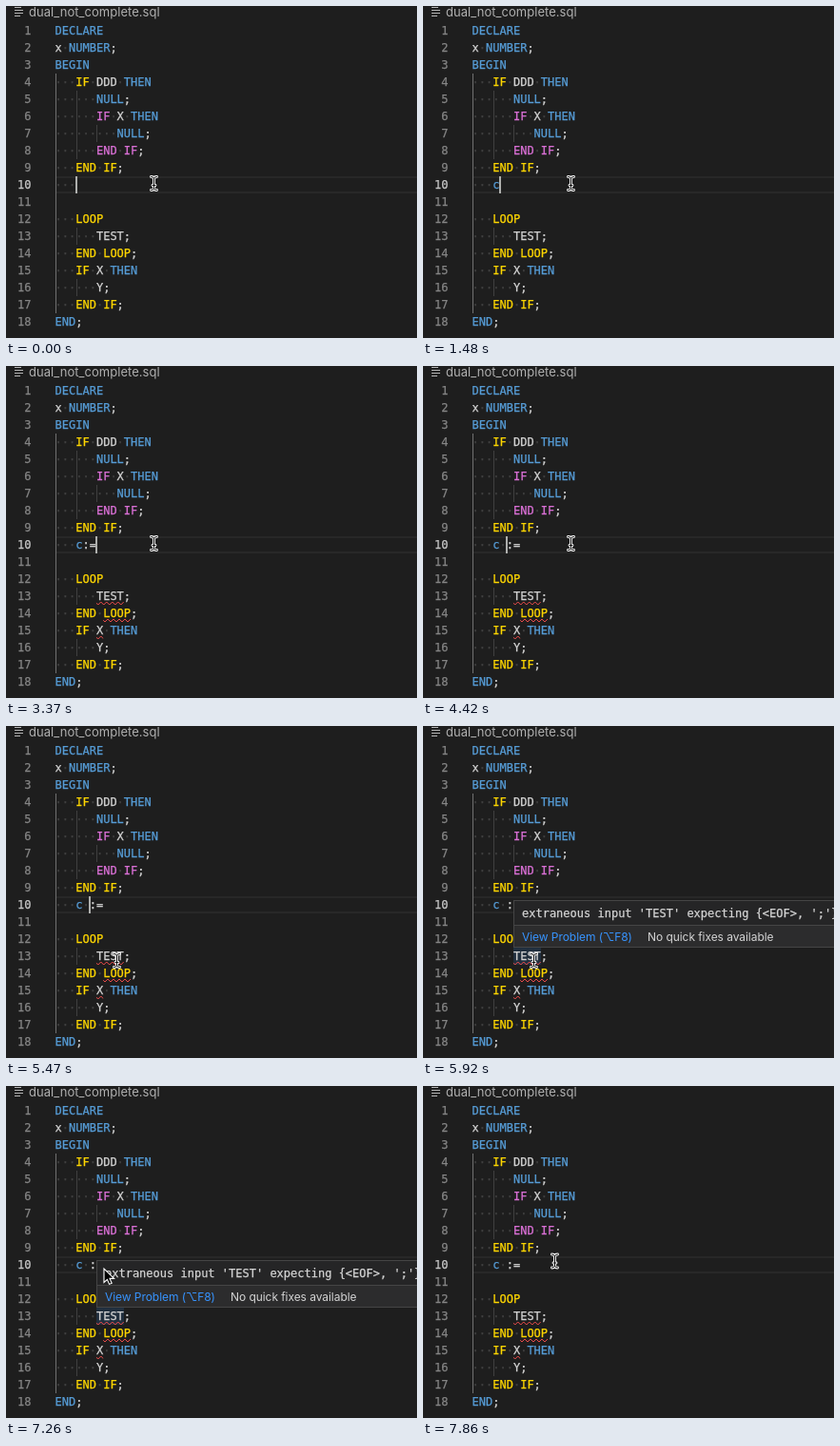
An HTML page for the animation above (8 s loop, 432x349 px).

```html
<!DOCTYPE html>
<html lang="en">
<head>
<meta charset="utf-8">
<style>
  html, body { margin: 0; width: 100%; height: 100%; overflow: hidden; background: #1e1e1e; }
  svg { display: block; }
  text { white-space: pre; color: #d4d4d4; fill: currentColor; }
  .mono { font: 12px "DejaVu Sans Mono", monospace; }
  .mono text, text.mono { stroke: currentColor; stroke-width: .25px; }
  .ui { font: 12px Inter, "DejaVu Sans", sans-serif; letter-spacing: -.06px; }
  .title { font-size: 13px; letter-spacing: .04px; color: #b0b0b0; }
  .link { color: #3794ff; }
  .y { color: #ffd700; }
  .m { color: #da70d6; }
  .b { color: #569cd6; }
  .dot { color: #404040; }
  .num { color: #858585; text-anchor: end; }
  .active { color: #c6c6c6; }
  .wave { fill: none; stroke: #f14c4c; }
</style>
</head>
<body>
<svg width="432" height="349" viewBox="0 0 432 349">
  <rect width="432" height="349" fill="#1e1e1e"/>
  <path d="M9 1.5h7M9 4.5h9M9 7.5h9M9 10.5h6" stroke="#b5b5b5"/>
  <text class="ui title" x="24" y="10.5">dual_not_complete.sql</text>
  <path d="M52 180H432M52 196H432" stroke="#282828" stroke-width="2"/>
  <rect id="hover" x="95" y="233" width="29" height="18" fill="#264f78" opacity=".35"/>
  <g id="guides" shape-rendering="crispEdges"></g>
  <g id="code" class="mono"></g>
  <g id="typed" class="mono"></g>
  <g id="waves"></g>
  <rect id="caret" y="179" width="2" height="18" fill="#aeafad"/>
  <g id="tip">
    <rect x="95.5" y="183.5" width="345" height="49" fill="#252526" stroke="#454545"/>
    <rect x="96" y="210" width="344" height="22" fill="#2c2c2d"/>
    <path d="M96 209.5H432" stroke="#454545"/>
    <text class="mono" x="104" y="201">extraneous input 'TEST' expecting {&lt;EOF&gt;, ';'}</text>
    <text class="ui link" x="104" y="225.5">View Problem (⌥F8)</text>
    <text class="ui" x="236" y="225.5">No quick fixes available</text>
  </g>
  <g id="beam" fill="none" stroke-linecap="round">
    <path id="beamShape" d="M-3 -7Q0 -7 0 -5Q0 -7 3 -7M0 -5V5M-3 7Q0 7 0 5Q0 7 3 7M-1.5 2H1.5" stroke="#fff" stroke-width="2.8"/>
    <use href="#beamShape" id="beamCore"/>
  </g>
  <path id="arrow" d="M0 0V14.5L3.4 11.4L5.6 16.4L8.2 15.3L6 10.4H10.6Z" fill="#000" stroke="#fff" stroke-width="1.1"/>
</svg>
<script>
const LOOP = 8000, STEP = 148, BLINK = 490, CHECK_DELAY = 290;
const LEFT = 51.6, CHAR = 7.224, ROW = 18, INDENT = 3;
const $ = id => document.getElementById(id);
const colX = col => LEFT + col * CHAR;
const rowTop = row => ROW * row - 1;

// A word may start with a colour key: y, m or b.
const lines = `b:DECLARE
x b:NUMBER;
b:BEGIN
   y:IF DDD b:THEN
      b:NULL;
      m:IF X b:THEN
         b:NULL;
      m:END m:IF;
   y:END y:IF;


   y:LOOP
      TEST;
   y:END y:LOOP;
   y:IF X b:THEN
      Y;
   y:END y:IF;
b:END;`.split('\n');

const plain = src => src.replace(/[ymb]:/g, '');
const text = (x, y, str, cls = '') => `<text x="${x}" y="${y}" class="${cls}">${str}</text>`;

function codeLine(src, row) {
  const y = rowTop(row) + 13;
  let col = 0, out = '';
  src.split(' ').forEach((word, i) => {
    if (i) out += text(colX(col++), y, '·', 'dot');
    const [, key = '', head, tail] = word.match(/^(?:([ymb]):)?(.*?)([;:=]*)$/);
    if (head) out += text(colX(col), y, head, key);
    col += head.length;
    if (tail) out += text(colX(col), y, tail);
    col += tail.length;
  });
  return out;
}

let indent = 0, guides = '', code = '';
lines.forEach((src, i) => {
  const row = i + 1;
  if (src) indent = src.search(/\S/);
  for (let col = 0; col < indent; col += INDENT)
    guides += `<rect x="${Math.ceil(colX(col))}" y="${rowTop(row)}" width="1" height="${ROW}" fill="${col ? '#404040' : '#707070'}"/>`;
  code += text(26.5, rowTop(row) + 13, row, row === 10 ? 'num active' : 'num') + codeLine(src, row);
});
$('guides').innerHTML = guides;
$('code').innerHTML = code;

function wave([row, word], typed) {
  const col = plain(row === 10 ? typed : lines[row - 1]).indexOf(word);
  return `<svg x="${colX(col)}" y="${rowTop(row) + 15}" width="${word.length * CHAR}" height="3">` +
    `<path class="wave" d="M-1.2 0${'l3 3l3 -3'.repeat(6)}"/></svg>`;
}

// Each edit: time, text of the line, caret column, errors found a little later.
const later = [[14, 'LOOP'], [15, 'X']];
const final = [[13, 'TEST'], ...later];
const edits = [
  [-210, '   ', 3, []],
  [1480, '   b:c', 4, [[12, 'LOOP']]],
  [1930, '   b:c:', 5, [[10, ':'], ...later]],
  [3080, '   b:c:=', 6, final],
  [3970, '   b:c:=', 5, final],
  [4120, '   b:c:=', 4, final],
  [4420, '   b:c :=', 5, final]
];

// Pointer legs: start, steps, control point, end point.
const home = [155.5, 186.5];
const legs = [
  [4870, 5, [198, 210], [116.5, 246.5]],
  [6370, 4, [105, 197], [105, 155]],
  [6962, 3, [103, 170], [103, 192]],
  [7406, 4, [115, 166], [138.5, 184]]
];

function pointerAt(t) {
  let pos = home;
  for (const [start, steps, ctrl, end] of legs) {
    if (t < start) break;
    const u = Math.min(1, (Math.floor((t - start) / STEP) + 1) / steps);
    pos = pos.map((p, i) => (1 - u) ** 2 * p + 2 * u * (1 - u) * ctrl[i] + u * u * end[i]);
  }
  return pos;
}

const last = t => edits.findLast(e => e[0] <= t) || edits[0];
const show = (el, on) => el.setAttribute('visibility', on ? 'visible' : 'hidden');
const cache = {};
function fill(id, html) {
  if (cache[id] !== html) $(id).innerHTML = cache[id] = html;
}

function draw(t) {
  const [time, src, col] = last(t);
  fill('typed', codeLine(src, 10));
  fill('waves', last(t - CHECK_DELAY)[3].map(e => wave(e, src)).join(''));
  $('caret').setAttribute('x', Math.floor(colX(col)));
  show($('caret'), Math.floor((t - time) / BLINK) % 2 === 0);

  const hovering = t >= 5920 && t < 7406;
  show($('tip'), hovering);
  show($('hover'), hovering);

  const [x, y] = pointerAt(t);
  const overTip = hovering && y > 183 && y < 233;
  for (const id of ['beam', 'arrow']) $(id).setAttribute('transform', `translate(${x} ${y})`);
  show($('beam'), !overTip);
  show($('arrow'), overTip);
}

const core = $('beamShape').cloneNode();
core.removeAttribute('id');
core.setAttribute('stroke', '#111');
core.setAttribute('stroke-width', 1);
$('beamCore').replaceWith(core);

const start = performance.now();
function tick() {
  draw((performance.now() - start) % LOOP);
  requestAnimationFrame(tick);
}
draw(0);
requestAnimationFrame(tick);
</script>
</body>
</html>
```
